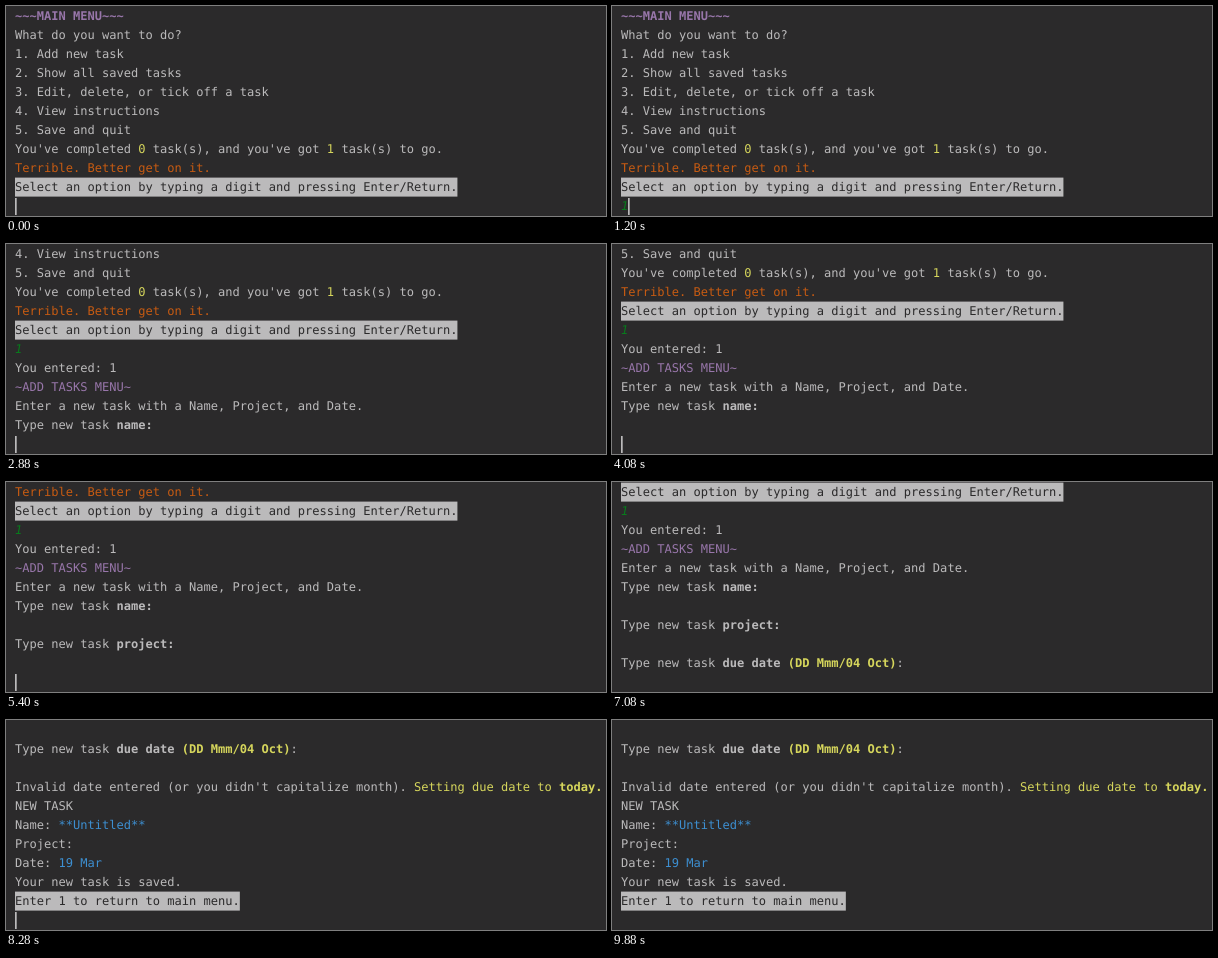
Write an HTML page with a canvas that moves like this. It is 600 px wide and 210 px high and loops after 10000 ms.

```html
<!DOCTYPE html>
<html lang="en">
<head>
<meta charset="utf-8">
<title>Task list console</title>
<style>
  html, body { margin: 0; height: 100%; overflow: hidden; background: #2b2a2b; }
  canvas { display: block; }
</style>
</head>
<body>
<canvas width="600" height="210"></canvas>
<script>
const ctx = document.querySelector('canvas').getContext('2d');
const LOOP = 10000, BLINK = 530, ROW = 19, LEFT = 9, CARET_ROW = 10;
const BG = '#2b2a2b', GREY = '#bbbabb';

// A run of text with its style; plain strings are grey.
const run = (color, weight = '', back = null) => text => ({ text, color, weight, back });
const bold = run(GREY, 'bold');
const purple = run('#9876aa');
const title = run('#9876aa', 'bold');
const yellow = run('#d6d65c');
const hint = run('#d6d65c', 'bold');
const orange = run('#c75b12');
const blue = run('#3d8fd1');
const typed = run('#087a1c', 'italic');
const marked = run(BG, '', GREY);

const log = [
  [title('~~~MAIN MENU~~~')],
  ['What do you want to do?'],
  ['1. Add new task'],
  ['2. Show all saved tasks'],
  ['3. Edit, delete, or tick off a task'],
  ['4. View instructions'],
  ['5. Save and quit'],
  ["You've completed ", yellow('0'), " task(s), and you've got ", yellow('1'), ' task(s) to go.'],
  [orange('Terrible. Better get on it.')],
  [marked('Select an option by typing a digit and pressing Enter/Return.')],
  [typed('1')],
  ['You entered: 1'],
  [purple('~ADD TASKS MENU~')],
  ['Enter a new task with a Name, Project, and Date.'],
  ['Type new task ', bold('name:')],
  [],
  ['Type new task ', bold('project:')],
  [],
  ['Type new task ', bold('due date '), hint('(DD Mmm/04 Oct)'), ':'],
  [],
  ["Invalid date entered (or you didn't capitalize month). ", yellow('Setting due date to '), hint('today.')],
  ['NEW TASK'],
  ['Name: ', blue('**Untitled**')],
  ['Project:'],
  ['Date: ', blue('19 Mar')],
  ['Your new task is saved.'],
  [marked('Enter 1 to return to main menu.')],
];

// Each step: start time, line holding the caret, whether that line is typed, caret blink start.
const steps = [
  { at: 0, line: 10 },
  { at: 1200, line: 10, echo: true },
  { at: 1540, line: 11 },
  { at: 2800, line: 15 },
  { at: 4000, line: 16 },
  { at: 4440, line: 17 },
  { at: 5300, line: 18 },
  { at: 6300, line: 19 },
  { at: 7220, line: 20 },
  { at: 7600, line: 27, blink: 7220 },
];

function drawLine(runs, row) {
  const top = 0.6 + row * ROW;
  let x = LEFT;
  for (const part of runs) {
    const { text, color, weight, back } = part.text ? part : run(GREY)(part);
    ctx.font = `${weight} 12.05px "DejaVu Sans Mono", monospace`;
    const width = ctx.measureText(text).width;
    if (back) {
      ctx.fillStyle = back;
      ctx.fillRect(x, top, width, ROW);
    }
    ctx.fillStyle = color;
    ctx.fillText(text, x, 14 + row * ROW);
    x += width;
  }
  return x;
}

function draw(now) {
  const t = now % LOOP;
  const { at, line, echo, blink = at } = steps.findLast(step => step.at <= t);
  ctx.textRendering = 'geometricPrecision';
  ctx.fillStyle = BG;
  ctx.fillRect(0, 0, 600, 210);
  for (let row = 0; row < CARET_ROW; row++) drawLine(log[line - CARET_ROW + row], row);
  const caretX = drawLine(echo ? log[line] : [], CARET_ROW);
  if ((t - blink) % (2 * BLINK) < BLINK) {
    ctx.fillStyle = GREY;
    ctx.fillRect(Math.round(caretX), 192, 1.7, 17);
  }
  requestAnimationFrame(() => draw(performance.now()));
}
draw(performance.now());
</script>
</body>
</html>
```
